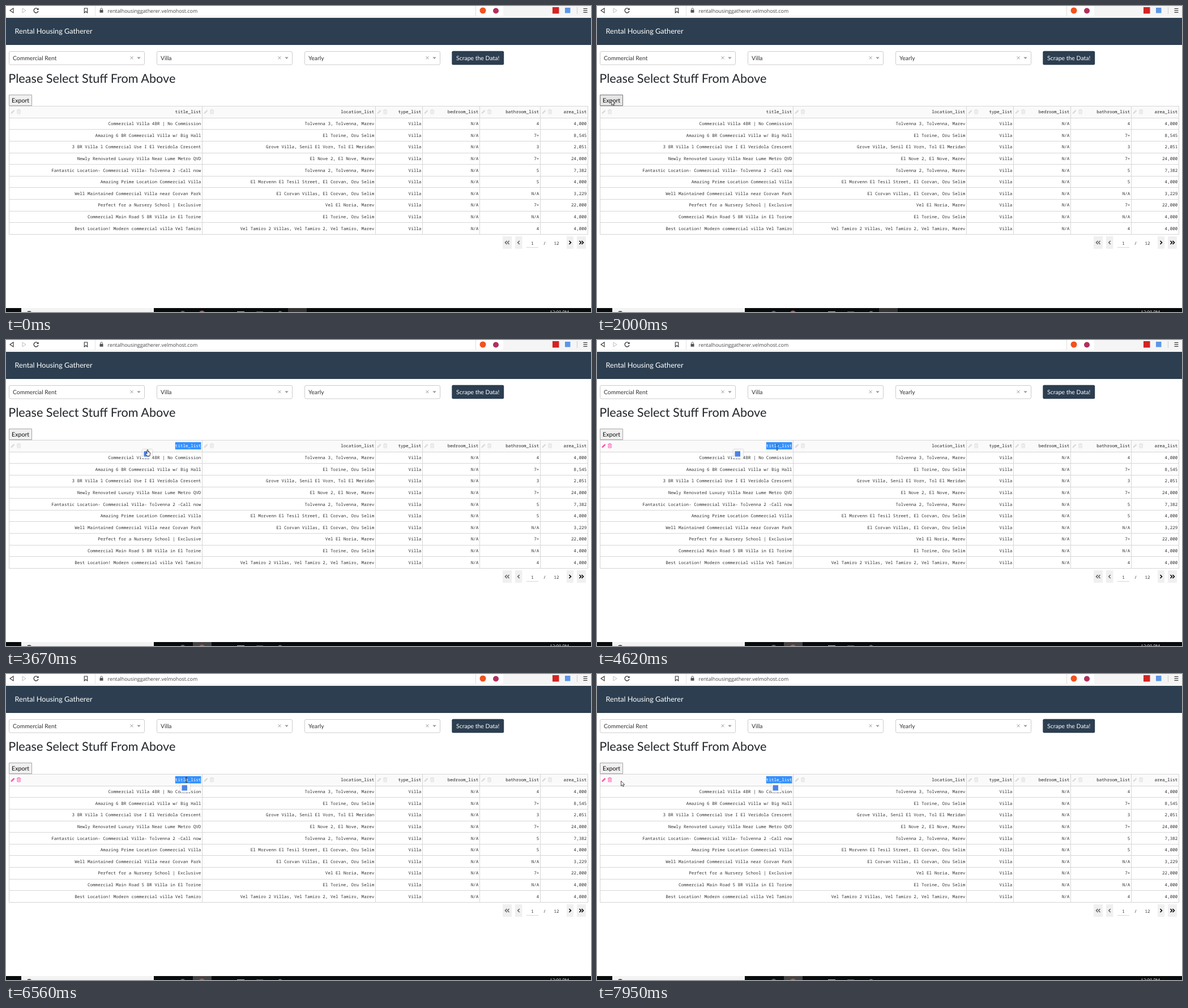
An HTML page with a canvas for the animation above (8 s loop, 1033 by 542 pixels).

```html
<!DOCTYPE html>
<html lang="en">
<head>
<meta charset="utf-8">
<title>Rental listings</title>
<style>
html, body { margin: 0; width: 100%; height: 100%; overflow: hidden; background: #fff; }
canvas { display: block; }
</style>
</head>
<body>
<canvas id="stage" width="1033" height="542"></canvas>
<script>
const ctx = document.getElementById('stage').getContext('2d');
ctx.textRendering = 'geometricPrecision';

const LOOP = 8000;
const NAVY = '#2c3e50', LINE = '#d6d6d6', BLUE = '#3390ff';
const MONO = '7.6px "Noto Sans Mono", monospace';
const lato = size => `${size}px Lato, sans-serif`;
const sans = size => `${size}px "Open Sans", sans-serif`;

const EDGES = [5, 346, 652, 735, 836, 943, 1027];
const HEADS = ['title_list', 'location_list', 'type_list', 'bedroom_list', 'bathroom_list', 'area_list'];
const TOP = 177.7, ROW = 20.61;
const ROWS = `Commercial Villa 4BR | No Commission;Tolvenna 3, Tolvenna, Marev;4;4,000
Amazing 6 BR Commercial Villa w/ Big Hall;El Torine, Oru Selim;7+;8,545
3 BR Villa l Commercial Use I El Veridola Crescent;Grove Villa, Senil El Vorn, Tol El Meridan;3;2,051
Newly Renovated Luxury Villa Near Lume Metro QVD;El Nove 2, El Nove, Marev;7+;24,000
Fantastic Location- Commercial Villa- Tolvenna 2 -Call now;Tolvenna 2, Tolvenna, Marev;5;7,382
Amazing Prime Location Commercial Villa;El Morvenn El Tesil Street, El Corvan, Oru Selim;5;4,000
Well Maintained Commercial Villa near Corvan Park;El Corvan Villas, El Corvan, Oru Selim;N/A;3,229
Perfect for a Nursery School | Exclusive;Vel El Noria, Marev;7+;22,000
Commercial Main Road 5 BR Villa in El Torine;El Torine, Oru Selim;N/A;4,000
Best Location! Modern commercial villa Vel Tamiro;Vel Tamiro 2 Villas, Vel Tamiro 2, Vel Tamiro, Marev;4;4,000`
  .split('\n').map(line => {
    const [title, place, baths, area] = line.split(';');
    return [title, place, 'Villa', 'N/A', baths, area];
  });

// Pointer moves: start, end, number of steps, then the points passed.
const MOVES = [
  [370, 440, 2, [781, 405], [734, 373]],
  [670, 830, 3, [690, 359], [557, 313.5]],
  [980, 1130, 3, [520, 297], [404, 256]],
  [1290, 1440, 3, [338, 242], [182, 180]],
  [1590, 2370, 11, [150, 177], [62, 170], [25, 166], [22, 167], [38, 168]],
  [2520, 2600, 2, [40, 166], [42, 168]],
  [2830, 3590, 11, [55, 167], [160, 180], [243, 186], [245, 187], [247, 193]],
  [3670, 3670, 1, [249, 194]],
  [3990, 4620, 9, [256, 195], [290, 192], [318, 190.5]],
  [4770, 5000, 3, [318, 189], [318.5, 187.5]],
  [7170, 7480, 5, [312, 185], [265, 175], [230, 178], [205, 178], [177, 177]],
  [7650, 7950, 5, [160, 176], [85, 181], [42, 189]]
];

function pointerAt(t) {
  const move = MOVES.filter(m => m[0] <= t).pop();
  if (!move) return null;
  const [start, end, steps, ...pts] = move;
  const span = end - start;
  const step = span ? Math.min(steps - 1, Math.floor((t - start) / span * (steps - 1) + 0.01)) : 0;
  const pos = steps > 1 ? step / (steps - 1) * (pts.length - 1) : 0;
  const i = Math.min(Math.floor(pos), Math.max(0, pts.length - 2));
  const a = pts[i], b = pts[i + 1] || a;
  return { x: a[0] + (b[0] - a[0]) * (pos - i), y: a[1] + (b[1] - a[1]) * (pos - i) };
}

const within = (t, a, b) => t >= a && t < b;

function stateAt(t) {
  const p = pointerAt(t);
  const hand = within(t, 3670, 3990);
  const beam = within(t, 830, 980) || within(t, 4380, 7240);
  return {
    p, cursor: hand ? drawHand : beam ? drawBeam : drawArrow,
    selected: within(t, 3210, 4770) || within(t, 4930, 6640) || t >= 6715,
    popup: within(t, 3360, 4770) ? 249 : within(t, 5000, 6640) || t >= 6870 ? 316 : 0,
    focused: t >= 3210,
    headHover: p && !hand && p.x < 346 && p.y >= 176 && p.y < 198,
    exportHover: p && p.x < 46 && p.y > 157 && p.y < 176
  };
}

function box(x, y, w, h, fill, stroke, r = 0) {
  ctx.beginPath();
  ctx.roundRect(x, y, w, h, r);
  if (fill) { ctx.fillStyle = fill; ctx.fill(); }
  if (stroke) { ctx.strokeStyle = stroke; ctx.lineWidth = 1; ctx.stroke(); }
}

function dot(x, y, r, fill) {
  ctx.beginPath();
  ctx.arc(x, y, r, 0, 7);
  ctx.fillStyle = fill;
  ctx.fill();
}

function text(str, x, y, font, color, align = 'left') {
  ctx.font = font;
  ctx.fillStyle = color;
  ctx.textAlign = align;
  ctx.fillText(str, x, y);
}

function path(d, x, y, fill, stroke, width = 1) {
  const shape = new Path2D(d);
  ctx.save();
  ctx.translate(x, y);
  if (fill) { ctx.fillStyle = fill; ctx.fill(shape); }
  if (stroke) { ctx.strokeStyle = stroke; ctx.lineWidth = width; ctx.stroke(shape); }
  ctx.restore();
}

function drawBrowser() {
  box(0, 0, 1033, 21, '#f5f5f5');
  box(0, 0, 878, 17, '#fff');
  path('M6 -4 L0 0 L6 4 Z', 7, 8, null, '#333', 1.1);
  path('M0 -4 L6 0 L0 4 Z', 29, 8, null, '#bbb');
  path('M3.2 -2.6 A4 4 0 1 0 4 1', 53, 8, null, '#333', 1.3);
  path('M4.6 -4.5 V-1 H1 Z', 53, 8, '#333');
  path('M-2.7 -4 H2.7 V4 L0 1.8 L-2.7 4 Z', 141, 8, null, '#333', 1.1);
  box(157, 0, 1, 17, '#e4e4e4');
  box(165.5, 7, 6, 4.8, '#555');
  path('M-1.7 0 V-1.5 A1.7 1.7 0 0 1 1.7 -1.5 V0', 168.5, 7, null, '#555');
  text('rentalhousinggatherer.velmohost.com', 179.5, 11.5, sans(8.9), '#444');
  box(829, 0, 1, 17, '#ddd');
  dot(842, 8, 5.5, '#f4511e');
  dot(865, 8.5, 5, '#b0305c');
  box(965, 2, 11.5, 11.5, '#d32323');
  box(987, 3, 9.5, 9.5, '#5b96e8');
  box(1008, 2, 1, 12, '#ccc');
  for (let i = 0; i < 3; i++) box(1019.5, 4 + i * 3.4, 7, 1.2, '#333');
}

function drawSelect(x, label) {
  box(x + 0.5, 80.5, 239, 23.5, '#fff', '#ccc', 2.5);
  text(label, x + 7, 95.6, lato(10.35), '#333');
  path('M-2.5 -2.5 L2.5 2.5 M2.5 -2.5 L-2.5 2.5', x + 217, 91.7, null, '#999', 1);
  path('M-3.2 -1.5 H3.2 L0 1.9 Z', x + 229.5, 92, '#999');
}

function drawForm(s) {
  box(0, 21, 1033, 48, NAVY);
  text('Rental Housing Gatherer', 15.5, 49.3, lato(12.7), '#fff');
  drawSelect(5, 'Commercial Rent');
  drawSelect(266, 'Villa');
  drawSelect(527, 'Yearly');
  box(787.3, 79.8, 91.9, 24.4, NAVY, null, 2.5);
  text('Scrape the Data!', 833.2, 95.8, lato(10.5), '#fff', 'center');
  text('Please Select Stuff From Above', 4.3, 136, lato(21.65), '#212529');
  box(5.5, 157.5, 40, 19, s.exportHover ? '#e5e5e5' : '#f0f0f0', s.exportHover ? '#777' : '#a6a6a6');
  text('Export', 25.6, 171.1, lato(10.6), '#111', 'center');
}

function drawHeadIcons(x, color) {
  path('M-3.6 3.6 L-3 1.2 L1.6 -3.4 L3.5 -1.5 L-1.1 3.1 Z', x + 7, 187.3, color);
  path('M-3.5 -2.5 H3.5 M-1.3 -2.8 V-3.8 H1.3 V-2.8 M-2.6 -2.5 V3.6 H2.6 V-2.5 M-0.9 -1 V2.2 M0.9 -1 V2.2',
    x + 17.6, 187.3, null, color, 0.9);
}

function drawTable(s) {
  box(5, 178, 1023, 20, '#fafafa');
  const baseline = row => TOP + ROW * (row + 0.5) + 2.6;
  for (let i = 0; i <= 11; i++) box(5, Math.floor(TOP + ROW * i), 1023, 1, LINE);
  EDGES.forEach(x => box(x, 177, 1, 228, LINE));
  if (s.selected) box(298.8, 181, 45.6, 12.8, BLUE);
  HEADS.forEach((head, c) => {
    const chosen = c === 0 && s.selected;
    text(head, EDGES[c + 1] - 1.6, baseline(0) - 0.4, MONO, chosen ? '#fff' : '#222', 'right');
    drawHeadIcons(EDGES[c], c === 0 && s.headHover ? '#ff55b0' : '#dcdcdc');
  });
  ROWS.forEach((cells, r) => cells.forEach((cell, c) =>
    text(cell, EDGES[c + 1] - 1.6, baseline(r + 1), MONO, '#333', 'right')));
}

function drawPager() {
  const button = (x, w, dir, count, color) => {
    box(x, 408, w, 22, '#f0f0f0');
    for (let i = 0; i < count; i++) {
      const cx = x + w / 2 + (i - (count - 1) / 2) * 4;
      path(`M${-1.5 * dir} -3 L${1.5 * dir} 0 L${-1.5 * dir} 3`, cx, 419, null, color, 1.6);
    }
  };
  button(877, 16, -1, 2, '#666');
  button(899, 12.5, -1, 1, '#666');
  button(990, 12, 1, 1, '#000');
  button(1008, 16, 1, 2, '#000');
  text('1', 929.5, 422.7, MONO, '#333', 'center');
  text('/', 951, 423, MONO, '#333', 'center');
  text('12', 972, 422.7, MONO, '#333', 'center');
  box(919, 427, 21, 1, LINE);
}

function drawTaskbar(s) {
  box(0, 535, 1033, 7, '#080b0b');
  box(27, 535, 234, 7, '#f3f3f3');
  if (s.focused) box(330, 535, 33, 7, '#444');
  else box(498, 535, 33, 7, '#333');
  dot(41, 545, 5, '#555');
  dot(312, 545, 5, '#4a6670');
  dot(346, 545, 5.5, '#d8492c');
  box(408, 541, 13, 1, '#bbb');
  box(442, 541, 12, 1, '#567');
  dot(484, 545, 4.5, '#3a9aa5');
  text('12:00 PM', 977.3, 544.6, sans(7.8), '#fff', 'center');
}

function drawPopup(x) {
  ctx.save();
  ctx.shadowColor = 'rgba(0,0,0,.3)';
  ctx.shadowBlur = 2;
  box(x - 8.2, 193.5, 17.6, 16.5, '#fafafa', null, 2);
  ctx.restore();
  box(x - 5.5, 197, 9.5, 9.5, '#4c83e8');
}

function drawArrow({ x, y }) {
  path('M0.5 0.5 V9.3 L2.5 7.5 L3.9 10.5 L5.3 9.9 L4 7 H6.8 Z', x, y, '#fff', '#222', 0.8);
}

function drawBeam({ x, y }) {
  path('M-1.8 -4.5 H1.8 M-1.8 4.5 H1.8 M0 -4.5 V4.5', x, y, null, '#333', 0.9);
}

function drawHand({ x, y }) {
  path('M0 1 Q1 -0.6 1.9 1 V4 L5 5 Q5.8 5.4 5.6 7 L4.8 11.5 H0 L-2.6 7.6 Q-2.8 6.2 -1.3 6.5 L0 7.6 Z',
    x, y, '#fff', '#222', 0.9);
}

function draw(t) {
  const s = stateAt(t);
  box(0, 0, 1033, 542, '#fff');
  drawBrowser();
  drawForm(s);
  drawTable(s);
  drawPager();
  drawTaskbar(s);
  if (s.popup) drawPopup(s.popup);
  if (s.p) s.cursor(s.p);
}

const began = performance.now();
function tick() {
  draw((performance.now() - began) % LOOP);
  requestAnimationFrame(tick);
}
tick();
</script>
</body>
</html>
```
